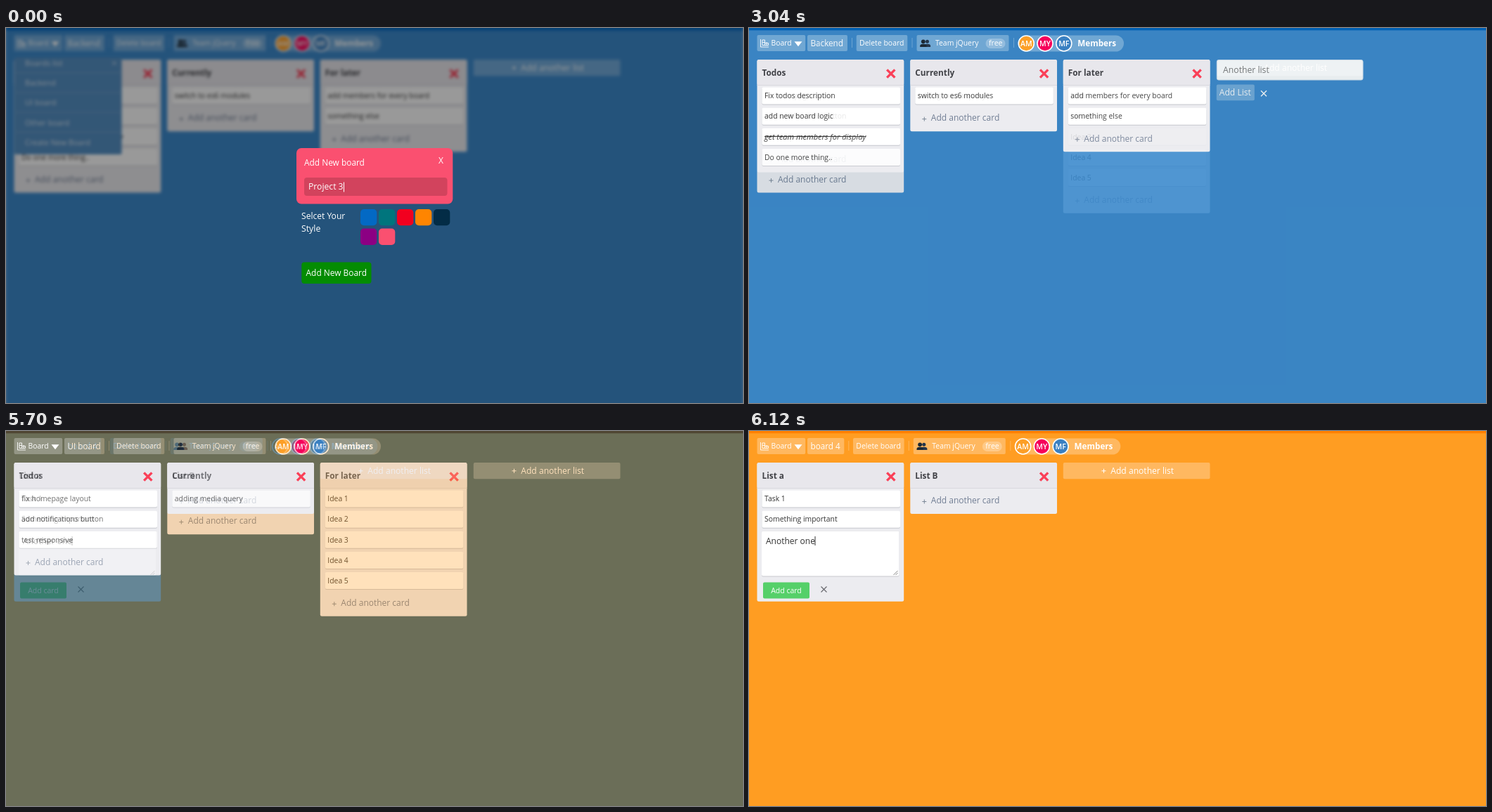
An HTML page for the animation above (8 s loop, 1048 by 534 pixels).

```html
<!DOCTYPE html>
<html lang="en">
<head>
<meta charset="utf-8">
<title>Task boards</title>
<style>
  html, body { margin: 0; width: 100%; height: 100%; overflow: hidden; }
  svg { display: block; width: 100%; height: 100%; }
  text { font-family: "Open Sans", "Noto Sans", sans-serif; white-space: pre; }
</style>
</head>
<body>
<svg id="stage" viewBox="0 0 1048 534" xmlns="http://www.w3.org/2000/svg"></svg>
<script>
const LOOP = 8000, FIRST_FADE = 500, FADE_EVERY = 2540, STEP = 60, STEPS = 10;
const COLUMN_X = [11.5, 229.3, 446.8, 664.8], COLUMN_W = 208.7, ROW = 29.15;
const GLASS = 'rgba(255,255,255,.28)';

const rect = (x, y, w, h, fill, r = 0, extra = '') =>
  `<rect x="${x}" y="${y}" width="${w}" height="${h}" rx="${r}" fill="${fill}" ${extra}/>`;
const text = (x, y, str, size, fill = '#fff', extra = '') =>
  `<text x="${x}" y="${y}" font-size="${size}" fill="${fill}" ${extra}>${str}</text>`;
const line = (d, stroke, width = 1, extra = '') =>
  `<path d="${d}" fill="none" stroke="${stroke}" stroke-width="${width}" ${extra}/>`;
const group = (content, extra) => `<g ${extra}>${content}</g>`;
const cross = (x, y, r, stroke, width) =>
  line(`M${x - r} ${y - r}l${2 * r} ${2 * r}m0 ${-2 * r}l${-2 * r} ${2 * r}`, stroke, width);
const plus = (x, y, stroke) => line(`M${x - 3} ${y}h6m-3 -3v6`, stroke);

function boardIcon() {
  return line('M16.5 16v11h11.5M19 17h3.5v7.500h-3.500zM19 20.500h3.500M25 20v4.500M22.500 21.500h5v3h-5', '#fff', .9);
}

function teamIcon() {
  const person = (x, r) => `<circle cx="${x}" cy="${19.3}" r="${r}"/>` +
    `<path d="M${x - 4.6} 27v-1.6q0-2.600 4.600-2.600t4.600 2.600v1.600z"/>`;
  return group(person(253.5, 2.5), 'fill="#26364a"') + group(person(247.8, 2.9), 'fill="#1c2833"');
}

function avatar(x, initials, fill) {
  return `<circle cx="${x}" cy="22" r="11" fill="${fill}" stroke="#fff" stroke-width="1.6"/>` +
    text(x, 25.8, initials, 10.5, '#fff', 'font-weight="600" text-anchor="middle"');
}

function header(name, nameWidth) {
  const divider = x => line(`M${x} 14v14`, 'rgba(255,255,255,.25)');
  const rest = divider(146.5) +
    rect(152.7, 10, 72.6, 23, GLASS, 2) + text(157, 25.4, 'Delete board', 10.5) +
    divider(232) +
    rect(238.5, 10, 131, 23, GLASS, 2) + teamIcon() +
    text(265, 25.4, 'Team jQuery', 10.4) +
    rect(336.5, 15, 28, 14, 'rgba(255,255,255,.25)', 7) + text(341, 25.4, 'free', 10.5) +
    divider(376.5) +
    `<path d="M394 10.500h127.500a11.500 11.500 0 0 1 0 23h-127.500a11.500 11.500 0 0 1 0-23z" fill="${GLASS}"/>` +
    avatar(394.3, 'AM', '#fc9f27') + avatar(421, 'MY', '#f6005a') + avatar(447.8, 'MF', '#3a80c1') +
    text(467.3, 26, 'Members', 11.7, '#fff', 'font-weight="700"');
  return rect(11.5, 10, 68.7, 23, GLASS, 2) + boardIcon() + text(31.5, 25.4, 'Board', 10.4) +
    '<path d="M64.500 19.300h11l-5.500 7z" fill="#fff"/>' +
    rect(83, 10, nameWidth, 23, GLASS, 2) + text(87.5, 25.7, name, 11.7) +
    group(rest, `transform="translate(${nameWidth - 57} 0)"`);
}

function card(x, i, label) {
  const y = 84.5 + i * ROW, done = label[0] === '~';
  const style = done ? 'font-style="italic" text-decoration="line-through"' : '';
  return rect(x + 7, y + 1, 196.5, 24, '#c6c8ce', 2) + rect(x + 7, y, 196.5, 24, '#fff', 2) +
    text(x + 10.5, y + 15.7, done ? label.slice(1) : label, done ? 11 : 10.4, '#333', style);
}

function cardForm(x, y, draft) {
  return rect(x + 6.5, y, 195.5, 65, '#c9c9ce', 2) + rect(x + 6.5, y, 195.5, 64, '#fff', 2) +
    text(x + 12.5, y + 18.3, draft, 12, '#333') + line(`M${x + 82.5} ${y + 7.5}v13`, '#333') +
    line(`M${x + 194} ${y + 62.5}l6 -6m-3 6l3 -3`, '#777', .9) +
    rect(x + 8.5, y + 73, 66, 23, '#55d069', 2) + text(x + 19.7, y + 88, 'Add card', 10.5) +
    cross(x + 95, y + 83, 4, '#66666b', 1.1);
}

function list(column, title, cards, draft) {
  const x = COLUMN_X[column], n = cards.length;
  const bottom = draft ? 242.7 : 118 + n * ROW;
  const footY = 99 + n * ROW;
  const foot = draft ? cardForm(x, 142.5, draft)
    : plus(x + 20, footY + 1.5, '#7b8797') + text(x + 29.5, footY + 4.2, 'Add another card', 12, '#717e94');
  return rect(x, 45, COLUMN_W, bottom - 45, '#ececf0', 2.5) +
    rect(x, 45, COLUMN_W, 36.5, '#e8e7ec', 2.5) + line(`M${x} 81.500h${COLUMN_W}`, '#d9d8de') +
    text(x + 7, 67.6, title, 11.8, '#414247', 'font-weight="700"') +
    cross(x + 190.3, 65, 5.6, '#fa4058', 3.4) +
    cards.map((label, i) => card(x, i, label)).join('') + foot;
}

function addListButton(column) {
  const x = COLUMN_X[column];
  return rect(x, 45, COLUMN_W, 23.3, GLASS, 2) + plus(x + 57.7, 56.8, '#fff') +
    text(x + 67.5, 60.8, 'Add another list', 12.1);
}

function addListForm(column) {
  const x = COLUMN_X[column];
  return rect(x + .5, 45.5, COLUMN_W - 1, 28.5, '#fff', 2.5, 'stroke="#d5e3f0"') +
    text(x + 9.3, 64.2, 'Another list', 12.2, '#777') +
    rect(x, 80.5, 54, 22.7, GLASS, 2) + text(x + 4, 96.2, 'Add List', 12.1) +
    cross(x + 67.2, 93.2, 4, '#fff', 1.4);
}

// The page reaches a little past the sides so that blurring softens its edges.
function board(background, strip, content) {
  return rect(-1.5, -20, 1051, 574, background) + rect(-1.5, -20, 1051, 23.3, strip) + content;
}

function boardMenu() {
  const items = ['Boards list', 'Backend', 'UI board', 'Other board', 'Create New Board'];
  return rect(12, 42, 152.5, 138, '#5590c4', 2) +
    items.map((item, i) => text(27, 54 + 28.2 * i, item, 11, 'rgba(255,255,255,.8)') +
      (i ? line(`M14 ${35.5 + 28.2 * i}h149`, 'rgba(255,255,255,.2)') : '')).join('') +
    cross(154, 50, 3, 'rgba(255,255,255,.7)', 1);
}

function newBoardDialog() {
  const swatches = ['#0369c4', '#00757d', '#f2001f', '#ff8500', '#032c46', '#8c0083', '#fa5070'];
  return rect(413, 171, 222.3, 79.5, '#fa5070', 7) +
    text(424, 195.8, 'Add New board', 11.9) + text(615, 193, 'X', 12) +
    rect(424, 213, 203.5, 26, '#d2435d', 4) +
    text(430, 230.3, 'Project 3', 12.2) + line('M480.500 219.500v14', '#fff') +
    text(420, 272, 'Selcet Your', 12.1) + text(420, 290.3, 'Style', 12.3) +
    swatches.map((fill, i) =>
      rect(504 + 26 * (i % 5), 258 + 27.6 * Math.floor(i / 5), 23.3, 23.3, fill, 5)).join('') +
    rect(420.3, 333.5, 99.2, 30.5, '#048c02', 4) + text(426.6, 353, 'Add New Board', 11.9);
}

const backendLists =
  list(0, 'Todos', ['Fix todos description', 'add new board logic',
    '~get team members for display', 'Do one more thing..']) +
  list(1, 'Currently', ['switch to es6 modules']) +
  list(2, 'For later', ['add members for every board', 'something else']);
const backend = extra => board('#3c8acd', '#0268c1', header('Backend', 57) + backendLists + extra);

const scenes = [
  rect(0, 0, 1048, 534, '#fff') +
    group(backend(addListButton(3) + boardMenu()), 'filter="url(#soft)"') +
    rect(0, 0, 1048, 534, 'rgba(0,0,0,.4)') + newBoardDialog(),
  backend(addListForm(3)),
  board('#2b5a6f', '#042e4a', header('UI board', 57) +
    list(0, 'Todos', ['fix homepage layout', 'add notifications button', 'test responsive']) +
    list(1, 'Currently', ['adding media query']) +
    list(2, 'For later', [1, 2, 3, 4, 5].map(n => 'Idea ' + n)) + addListButton(3)),
  board('#ff9d22', '#ff8000', header('board 4', 52.3) +
    list(0, 'List a', ['Task 1', 'Something important'], 'Another one') +
    list(1, 'List B', []) + addListButton(2))
];

const stage = document.getElementById('stage');
stage.innerHTML =
  '<defs><filter id="soft" filterUnits="userSpaceOnUse" x="-20" y="-20" width="1088" height="574" ' +
  'color-interpolation-filters="sRGB"><feGaussianBlur stdDeviation="2"/></filter></defs>' +
  scenes.map(scene => group(scene, 'class="scene"')).join('');
const layers = [...stage.querySelectorAll('.scene')];

function fadeIn(i, t) {
  if (i === 0) return 1;
  if (i >= layers.length) return 0;
  const step = Math.floor((t - FIRST_FADE - (i - 1) * FADE_EVERY) / STEP) + 1;
  return Math.min(Math.max(step / STEPS, 0), 1);
}

function draw(now) {
  const t = now % LOOP;
  layers.forEach((layer, i) => {
    const alpha = fadeIn(i, t);
    layer.style.opacity = alpha;
    layer.style.display = alpha === 0 || fadeIn(i + 1, t) === 1 ? 'none' : '';
  });
}

function tick() {
  draw(performance.now());
  requestAnimationFrame(tick);
}
tick();
</script>
</body>
</html>
```
